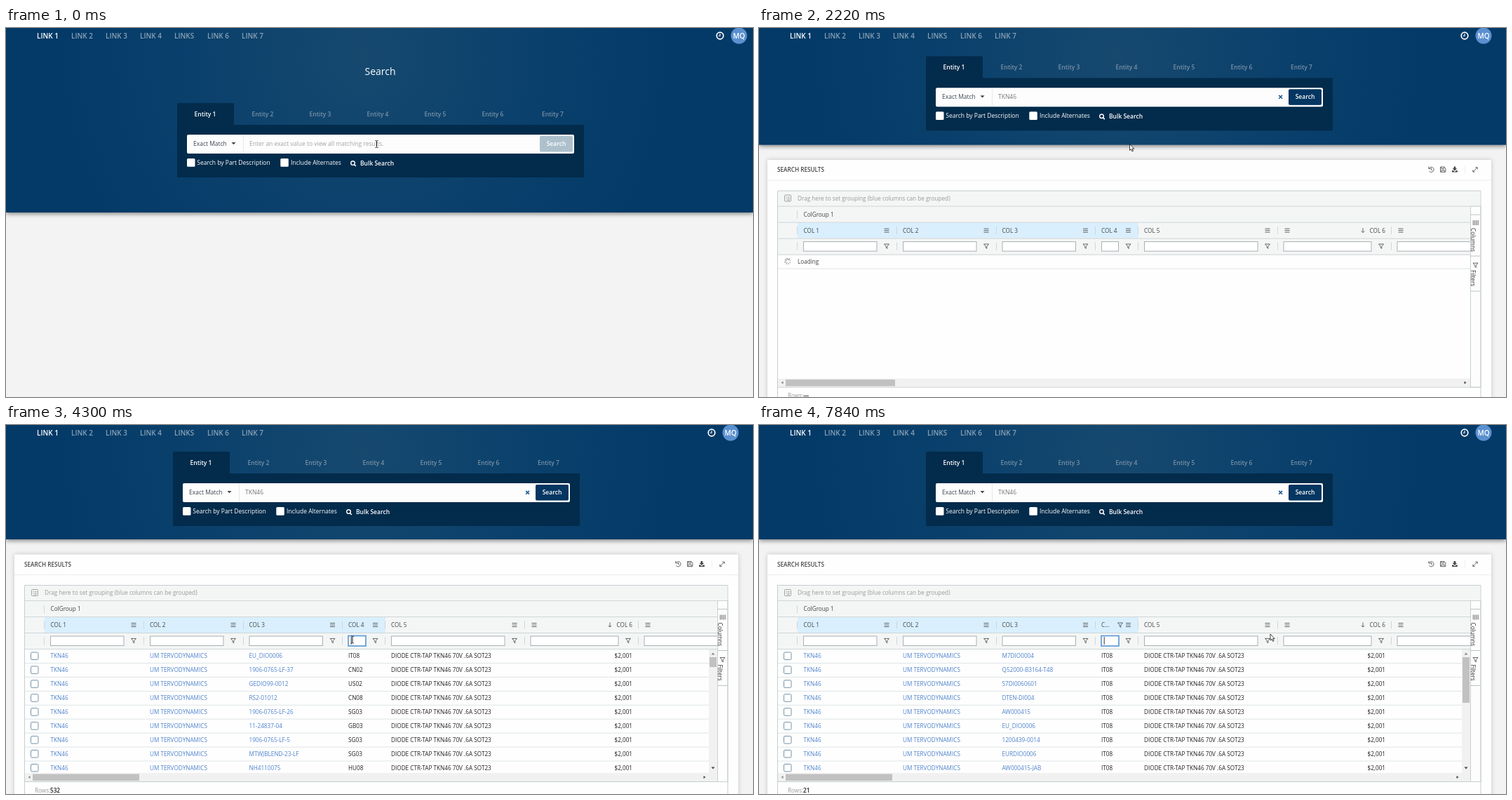
An HTML page for the animation above (8 s loop, 1065 by 526 pixels).

```html
<!DOCTYPE html>
<html lang="en">
<head>
<meta charset="utf-8">
<title>Search</title>
<style>
  html, body { margin: 0; width: 100%; height: 100%; overflow: hidden; background: #f3f3f3; }
  svg { display: block; width: 1065px; height: 526px; }
  text { font: 8.2px "Open Sans", "Noto Sans", sans-serif; fill: #444; white-space: pre; }
  .ui { font-size: 8.5px; fill: #fff; }
  .semi { font-weight: 600; }
  .nav { font-size: 10px; font-weight: 600; fill: #8aa1b6; }
  .on { fill: #fff; }
  .tab { fill: #7b91a5; font-weight: 600; }
  .hint { fill: #999; }
  .link { fill: #4f82cb; }
  .cell { fill: #222; }
  .end { text-anchor: end; }
  .mid { text-anchor: middle; }
  .icon { fill: none; stroke: #555; stroke-width: .9; }
  .line { fill: none; stroke: #cfd6d6; }
  .box { fill: #fff; stroke: #a9b0b3; }
  #header { filter: drop-shadow(0 2px 3px #0007); }
  #card { filter: drop-shadow(0 0 3px #0003); }
</style>
</head>
<body>
<svg id="stage" viewBox="0 0 1065 526"></svg>
<script>
const PART = 'TKN46', MAKER = 'UM TERVODYNAMICS', PLANT = 'IT08', LOOP = 8000;
const allCodes = ['EU_DIO0006', '1906-0765-LF-37', 'GEDIO99-0012', 'RS2-01012', '1906-0765-LF-26',
  '11-24837-04', '1906-0765-LF-5', 'MTWJBLEND-23-LF', 'NH4110075'];
const allPlants = ['IT08', 'CN02', 'US02', 'CN08', 'SG03', 'GB03', 'SG03', 'SG03', 'HU08'];
const filteredCodes = ['M7DIO0004', 'Q52000-B3164-T48', 'S7DI0060601', 'DTEN-DI004', 'AW000415',
  'EU_DIO0006', '1200439-0014', 'EURDIO0006', 'AW000415-JAB'];

// y is the middle of the capitals
const text = (x, y, s, cls = '', size = 8.3, extra = '') =>
  `<text x="${x}" y="${(y + size * .36).toFixed(2)}" class="${cls}" ${extra}>${s}</text>`;
const rect = (x, y, w, h, attrs = '') => `<rect x="${x}" y="${y}" width="${w}" height="${h}" ${attrs}/>`;
const path = (d, attrs = 'class="icon"') => `<path d="${d}" ${attrs}/>`;
const at = (x, y, body, id = '') => `<g ${id && `id="${id}"`} transform="translate(${x} ${y})">${body}</g>`;
const menu = (x, y) => path(`M${x - 3.5} ${y - 2.5}h7m-7 2.5h7m-7 2.5h7`);
const funnel = (x, y) => path(`M${x - 3.5} ${y - 3}h7l-2.7 3.2v3.2l-1.6-1.2v-2z`);
const group = (id, body) => `<g id="${id}">${body}</g>`;

function topBar() {
  const links = [44, 93, 142, 191, 240, 287, 336].map((x, i) =>
    text(x, i == 4 ? 11.7 : 11, i == 4 ? 'LINKS' : 'LINK ' + (i + 1), i ? 'nav' : 'nav on', 10));
  return links.join('') + group('account',
    '<circle cx="1018" cy="11" r="4.8" fill="none" stroke="#fff" stroke-width="1.7"/>' +
    path('M1018 8v3.2h-2.3', 'fill="none" stroke="#fff" stroke-width="1.1"') +
    '<circle cx="1045" cy="11" r="11.5" fill="#5b90d0"/>' +
    text(1045, 11, 'MQ', 'nav on mid', 10));
}

function searchPanel() {
  const tabs = [284, 366, 448, 530, 612, 694, 779.5].map((x, i) =>
    text(x, 122.6, 'Entity ' + (i + 1), 'ui mid ' + (i ? 'tab' : 'semi')));
  return path('M244 213V109q0-2 2-2h77q2 0 2 2v29h499v75z', 'fill="#032b4b"') + tabs.join('') +
    rect(258, 152, 552, 27, 'rx="2" fill="#fdfdfd"') +
    path('M338.5 152v27', 'stroke="#e8e8e8"') +
    text(267, 165, 'Exact Match', 'ui', 8.5, 'style="fill:#3d4650;font-weight:500"') +
    path('M321.5 163h6l-3 3.3z', 'fill="#444"') +
    text(347, 165, 'Enter an exact value to view all matching results.', 'ui', 8.5, 'id="placeholder" style="fill:#a3a3a3"') +
    text(347, 165, '', 'ui', 8.5, 'id="query" style="fill:#777"') +
    rect(0, 159, .9, 12, 'id="queryCaret" fill="#333"') +
    path('M747.2 162.8l4.8 4.8m0-4.8l-4.8 4.8', 'id="clear" stroke="#2a6296" stroke-width="1.7"') +
    rect(761, 154, 47, 22.5, 'rx="2" fill="#adc0cc"') +
    rect(761, 154, 47, 22.5, 'rx="2" fill="#043662" id="ready"') +
    text(784.5, 165.2, 'Search', 'ui semi mid') +
    rect(258, 186, 11.5, 11.8, 'rx="1.5" fill="#fff"') +
    rect(391.3, 186, 11.5, 11.8, 'rx="1.5" fill="#fff"') +
    text(272.3, 191.8, 'Search by Part Description', 'ui') +
    text(406, 191.8, 'Include Alternates', 'ui') +
    '<circle cx="494.5" cy="192.6" r="2.8" fill="none" stroke="#fff" stroke-width="1.4"/>' +
    path('M496.6 194.7l2.2 2.3', 'stroke="#fff" stroke-width="1.6"') +
    text(505, 192.9, 'Bulk Search', 'ui semi');
}

function cardIcons() {
  return path('M955.4 196.4a3.6 3.6 0 1 1 0 3.8M954.8 194v3h3M958.6 196v2.5l1.6 1', 'class="icon" stroke-width="1.3"') +
    path('M971.5 194.5h5.5l1.8 1.8v5.4h-7.3zM973 194.5v2.4h3.5v-2.4M973 201.7v-2.7h4v2.7') +
    path('M990.6 194h2.6v2.7h2l-3.3 3.2-3.3-3.2h2zM988 199.5h1.6l2.3 1.8 2.3-1.8h1.6v2.4H988z', 'fill="#444"') +
    path('M1006.5 193v11', 'stroke="#eee"') +
    path('M1018 201.3l6-6m-2.6-.2h2.8v2.8m-6.4 .8v2.8h2.8', 'class="icon" stroke-width="1.2"');
}

function gridHead() {
  const dividers = [54.5, 196.5, 338.5, 479.5, 540.5, 739.5, 901.5]
    .map(x => `M${x} 279.5v11M${x} 302v11`).join('');
  const inputs = [[63, 105], [205, 105], [346.5, 105], [488, 24.5], [549, 162], [747.5, 125.5], [909.5, 110]]
    .map(([x, w]) => rect(x + .5, 301, w - .5, 13.5, 'class="box"')).join('');
  const names = [63.5, 205, 346.5, 488, 549].map((x, i) =>
    text(x, 285.2, 'COL ' + (i + 1), '', 8.2, `id="col${i + 1}"`)).join('');
  return rect(26.5, 228, 1002, 92, 'fill="#f4f6f6"') +
    rect(55, 274, 486, 22, 'fill="#d9effe"') +
    path('M26 250.5h1003M26 273.5h988M26 296.5h988M26 319.5h988', 'class="line"') +
    path('M54.5 257v11' + dividers, 'class="line"') +
    rect(36.5, 234.5, 9, 9, 'rx="1" class="icon" style="stroke:#999"') +
    path('M38.5 237.5h1.3m1 0h3m-5.3 2.2h1.3m1 0h3m-4 2h4', 'class="icon" style="stroke:#999"') +
    text(55, 239.3, 'Drag here to set grouping (blue columns can be grouped)', 'hint') +
    text(63.5, 262.5, 'ColGroup 1') + names +
    text(893, 285.2, 'COL 6', 'end') +
    path('M861 281.5v6.5m-2.2-2.2l2.2 2.2 2.2-2.2') +
    [182, 324, 465.5, 526.5, 725, 753, 915].map(x => menu(x, 285)).join('') +
    inputs + [182, 324, 465.5, 526.5, 725, 887].map(x => funnel(x, 307.4)).join('') +
    group('colFunnel', funnel(515, 285)) +
    rect(488, 300.5, 25, 14.5, 'id="focus" fill="#fff" stroke="#5596d8" stroke-width="1.6"') +
    text(491.7, 307.6, '', 'hint', 8.2, 'id="filter" style="fill:#666"') +
    rect(0, 302, .9, 11, 'id="filterCaret" fill="#222"');
}

function gridRows(codes, plantOf) {
  return codes.map((code, i) => {
    const y = 329.5 + i * 19.93;
    return rect(35.5, y - 5.5, 10.5, 10.5, 'rx="1.5" fill="#fff" stroke="#7593a8"') +
      text(63.5, y, PART, 'link') + text(205, y, MAKER, 'link') +
      text(346.5, y, code, 'link') + text(488, y, plantOf(i), 'cell') +
      text(549, y, `DIODE CTR-TAP ${PART} 70V .6A SOT23`, 'cell') +
      text(893, y, '$2,001', 'cell end') +
      path(`M27 ${(y + 10).toFixed(1)}h975`, 'stroke="#dfe5e6"');
  }).join('');
}

function scrollbars() {
  return rect(27, 496, 987, 12, 'fill="#f1f1f1"') +
    rect(38, 497.5, 152, 9.5, 'id="thumbX" fill="#c1c1c1"') +
    path('M34.5 500l-3 2 3 2z', 'fill="#888"') +
    path('M994.5 500l3 2-3 2z', 'id="arrowX" fill="#444"') +
    group('scrollY', rect(1002, 320, 12, 176, 'fill="#f1f1f1"') +
      rect(1003, 331, 10, 14, 'id="thumbY" fill="#c1c1c1"') +
      path('M1005.5 327.5l2.5-3 2.5 3z', 'fill="#888"') +
      path('M1005.5 487.5l2.5 3 2.5-3z', 'fill="#444"'));
}

function sideBar() {
  const down = (y, s) => text(0, 0, s, '', 8.2, `transform="translate(1018 ${y}) rotate(90)" style="fill:#333"`);
  return rect(1014.5, 250.5, 14.5, 258, 'fill="#fdfdfd" stroke="#c9d0d0"') +
    path('M1014 262.5h15M1014 321.5h15M1014 371.5h15', 'class="line" style="stroke:#bcc4c4"') +
    path('M1018.3 270.5v7m2.3-7v7m2.3-7v7m2.3-7v7') + down(281.5, 'Columns') +
    funnel(1021.5, 334.5) + down(341.5, 'Filters');
}

function resultsCard() {
  const spokes = Array.from({ length: 8 }, (_, i) =>
    `<path d="M0-2.2v-2.6" stroke="#555" stroke-width="1.1" opacity="${.3 + i * .1}" transform="rotate(${i * 45})"/>`).join('');
  return rect(12, 184.5, 1032, 400, 'rx="2" fill="#fefefe" id="card"') +
    text(26, 198.6, 'SEARCH RESULTS', 'semi') + cardIcons() +
    path('M12 213.5h1032', 'stroke="#ececec"') + gridHead() +
    group('loading', at(41, 329, `<g id="spinner">${spokes}</g>`) +
      text(55, 329.3, 'Loading') + path('M27 339.5h987', 'stroke="#dfe5e6"')) +
    group('allRows', gridRows(allCodes, i => allPlants[i])) +
    group('filteredRows', gridRows(filteredCodes, () => PLANT)) +
    scrollbars() + rect(27, 508, 1002, 60, 'fill="#fefefe"') + sideBar() +
    path('M26.5 600V228.5H1029V600M26 508.5h1003', 'class="line" style="stroke:#c6cecf"') +
    text(41, 520.7, 'Rows:', 'hint') + text(63, 520.7, '', 'semi', 8.2, 'id="count" style="fill:#222"');
}

function pointers() {
  return group('beam', path('M-2-5h1.3l.7.7.7-.7H2M0-4.3v8.6M-2 5h1.3l.7-.7.7.7H2', 'fill="none" stroke="#222" stroke-width="1"')) +
    group('hand', path('M-.9.8q.9-1 1.8 0v4l4 .9q1.3.3 1.2 1.7l-.7 4.6H.2l-3.4-4.5q.2-1.5 2.3.2z',
      'fill="#fff" stroke="#222" stroke-width=".9"')) +
    group('arrow', path('M0 0v9l2-1.8 1.5 3.2 1.5-.7-1.5-3.1H6.2z', 'fill="#fff" stroke="#111" stroke-width=".8"'));
}

document.getElementById('stage').innerHTML =
  `<defs><radialGradient id="blue" gradientUnits="userSpaceOnUse" cx="510" cy="40" r="440">
    <stop offset="0" stop-color="#17496f"/><stop offset=".5" stop-color="#0b416c"/><stop offset="1" stop-color="#033a68"/>
  </radialGradient></defs>` +
  group('results', resultsCard()) +
  rect(0, -10, 1065, 273, 'id="header" fill="url(#blue)"') + topBar() +
  text(533.5, 62, 'Search', 'on mid', 14, 'id="title" style="font-size:14px"') +
  group('panel', searchPanel()) + group('pointer', pointers());

const el = {};
document.querySelectorAll('[id]').forEach(e => el[e.id] = e);
const show = (id, on) => el[id].style.display = on ? '' : 'none';
const move = (id, x, y) => el[id].setAttribute('transform', `translate(${x} ${y})`);
const set = (id, name, value) => el[id].setAttribute(name, value);
const put = (id, s) => { if (el[id].textContent !== s) el[id].textContent = s; };
const clamp = v => Math.min(1, Math.max(0, v));
const passed = (t, times) => times.filter(s => t >= s).length;
const within = (t, ...spans) => spans.some(([a, b]) => t >= a && t < b);
const held = (t, start, step) => start + Math.floor((t - start) / step) * step;

const queryKeys = [740, 930, 1070, 1330, 1530];
const filterKeys = [5180, 5370, 5640, 5780], filterErase = [7240, 7430, 7580, 7780];
const trips = [[2870, 3120, 450, 245], [3640, 4100, 494, 306], [6430, 6780, 729, 298]];

function pointerAt(t) {
  let x = 528.5, y = 165.5;
  for (const [a, b, tx, ty] of trips) {
    const u = t >= b ? 1 : clamp((held(t, a, 65) - a) / (b - a));
    const k = u * u * (3 - 2 * u);
    x += (tx - x) * k;
    y += (ty - y) * k;
  }
  return [x, y];
}

function typed(textId, caretId, s, caretOn) {
  put(textId, s);
  const x = +el[textId].getAttribute('x');
  set(caretId, 'x', x + (s ? el[textId].getComputedTextLength() : 0));
  show(caretId, caretOn);
}

function draw(t) {
  const open = t >= 2010, loaded = t >= 2800, filtered = t >= 6300;
  const u = clamp((held(t, 1940, 70) - 1960) / 300);
  const off = 100 * Math.pow(1 - u, 1.65);

  set('header', 'height', 173 + off);
  move('results', 0, off);
  show('results', open);
  show('title', !open);
  move('account', open ? -12 : 0, 0);
  move('panel', open ? -6 : 0, open ? -69 + off * .6 : 0);

  const n = passed(t, queryKeys);
  show('placeholder', !n);
  show('clear', n);
  typed('query', 'queryCaret', PART.slice(0, n), within(t, [400, 2010], [2800, 3310], [3840, 4130]));
  set('ready', 'opacity', clamp((t - 1070) / 260));

  show('loading', !loaded);
  set('spinner', 'transform', `rotate(${held(t, 1940, 67) * .36 % 360})`);
  show('allRows', loaded && !filtered);
  show('filteredRows', filtered);
  show('scrollY', loaded);
  set('thumbX', 'width', loaded ? 152 : 156);
  move('arrowX', loaded ? 0 : 11, 0);
  set('thumbY', 'height', filtered ? 65 : 14);
  put('count', filtered ? '21' : loaded ? '532' : '—');
  put('col4', filtered ? 'C...' : 'COL 4');
  show('colFunnel', filtered);

  show('focus', t >= 4130);
  const m = passed(t, filterKeys) - passed(t, filterErase);
  typed('filter', 'filterCaret', PLANT.slice(0, m), within(t, [4130, 4650], [5180, 6300], [7240, LOOP]));

  move('pointer', ...pointerAt(t));
  show('beam', within(t, [0, 740], [4030, 6430]));
  show('hand', within(t, [1940, 2010]));
  show('arrow', within(t, [2010, 4030], [6430, LOOP]));
}

const start = performance.now();
function tick() {
  draw((performance.now() - start) % LOOP);
  requestAnimationFrame(tick);
}
tick();
</script>
</body>
</html>
```
